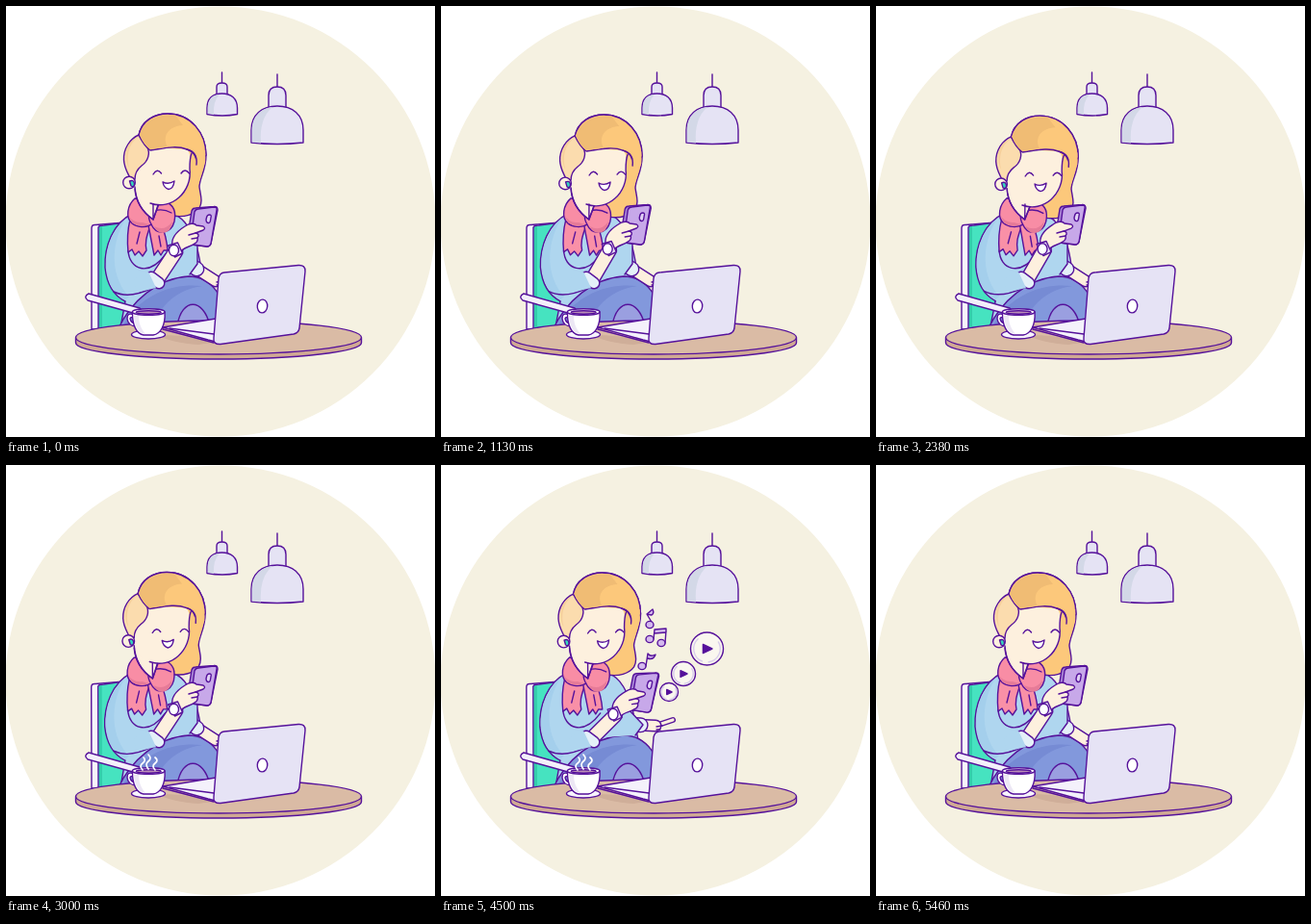
Recreate the animation shown at these times as an HTML page. Size 446 by 448 pixels, loop 5500 ms.

```html
<!DOCTYPE html>
<html lang="en">
<head>
<meta charset="utf-8">
<title>Music break</title>
<style>
html, body { margin: 0; width: 100%; height: 100%; overflow: hidden; background: #fff; }
svg { display: block; width: 446px; height: 448px; }
.ink { fill: none; stroke: #56129b; stroke-width: 1.4; stroke-linecap: round; stroke-linejoin: round; }
.flat { stroke: none; }
</style>
</head>
<body>
<svg viewBox="0 0 446 448">
  <circle cx="223" cy="224" r="223.5" fill="#f5f1e1"/>
  <g class="ink">
    <!-- lamps -->
    <path d="M224.5 69V80M282 71V85"/>
    <path fill="#e5e3f4" d="M219 93V84Q219 80 224.500 80T230 84V93ZM273 106V93Q273 84 282 84T291 93V106Z"/>
    <path fill="#e5e3f4" d="M209 112.500V106C209 96 215 91 224.500 91S240.500 96 240.500 106V112.500Q225 115.500 209 112.500Z"/>
    <path class="flat" fill="#d3d8e7" d="M209.700 112V106C210 97 215 92 222 92Q215 99 216 113Z"/>
    <path fill="#e5e3f4" d="M255 142V129C255 113 266 104 282 104S309 113 309 129V142Q282 145 255 142Z"/>
    <path class="flat" fill="#d3d8e7" d="M255.700 141.500V129C256 115 265 106 277 105Q263 117 265 142.500Z"/>

    <g id="chair">
      <path fill="#f7f5fb" d="M89 336V231Q89 227 93 227.500L124 225L128 336Z"/>
      <path fill="#46e3c0" d="M96 336V230Q97 228 102 228L124 225V336Z"/>
      <path class="flat" fill="#33cdab" d="M97 335V230L100 229V335Z"/>
    </g>

    <g id="torso">
      <path fill="#afd6ef" d="M131 216C111 226 102 250 103 272C105 292 114 302 124 307L118 340H215L204 280C201 260 198 240 186 225C178 215 163 211 150 212Z"/>
      <path class="flat" fill="#a4cfec" d="M124 222C110 232 104 252 104 270C106 291 114 300 124 306L128 302C110 284 107 250 124 222Z"/>
      <path d="M127 254C128 274 148 282 166 258M112 297Q128 305 152 293"/>
    </g>

    <path fill="#8298dc" d="M116 337C130 306 158 283 190 281C213 281 229 302 232 337Z"/>
    <path class="flat" fill="#768bd4" d="M127 322C148 298 174 288 204 291C184 294 164 304 153 332H122Z"/>
    <path fill="#9a9fe0" d="M178 332C183 303 205 303 212 332Z"/>

    <g id="farArm"></g>

    <g id="back">
      <g class="head">
        <path fill="#fcc87b" d="M138 135C140 119 154 112 168 112C192 112 208 132 208 155C208 171 201 179 201 188C202 196 205 203 201 210C196 217 185 220 174 218L150 190Z"/>
      </g>
      <path fill="#f990a7" d="M129 222C126 234 126 246 127 256L131 253L134 259L138 255L142 260L146 254C144 244 147 238 150 228Z"/>
      <path fill="#f990a7" d="M148 228L154 259L158 254L161 259L164 254L168 254Q167 240 161 225Z"/>
      <path fill="#f88da5" d="M134 200C126 207 124 220 131 226C136 230 145 231 151 227C157 240 172 236 175 224C177 214 174 207 167 204Z"/>
      <path class="flat" fill="#e67b98" d="M127 217Q132 226 142 225L149 227Q140 231 132 226ZM154 229Q165 235 173 224Q172 235 163 236Q157 236 154 229Z"/>
      <path d="M151 227Q145 216 154 213T172 215M139 235L136 247M159 239L161 250"/>
      <path fill="#fdf0de" d="M134 190C135 205 143 215 153 222L161 200Z"/>
    </g>

    <g class="head">
      <path class="flat" fill="#fdf0de" d="M138 134C129 138 122 148 122.500 160C123 168 127 174 128 179L134 187C135 199 147 208 162 207C182 204 193 190 191 169C191 160 193 154 188 149L150 147Z"/>
      <path d="M150 205C172 213 194 193 191 169Q191 158 193 153"/>
      <path fill="#fbdcae" d="M138 134C129 138 122 148 122.500 160C123 169 127 174 129 179L134 180C134 174 136 170 141 166C148 161 150 153 147 147Z"/>
      <path class="flat" fill="#f6d09c" d="M137 136C127 144 125 157 128 168C125 164 122 150 130 141Z"/>
      <path fill="#fcc87b" d="M138 134C142 118 156 112 168 112C192 112 208 132 208 155L198 168C199 157 196 151 188 149C176 144 160 149 150 150Q143 145 138 134Z"/>
      <path class="flat" fill="#f0bc74" d="M139 134C144 118 158 112 176 113.500L184 124C168 125 162 136 168 146.500L150 149Q143 144 139 134Z"/>
      <path class="flat" fill="#fcc87b" d="M199 152L207.200 150V162L200 186L193 190Q194 165 199 152Z"/>
      <path d="M198 165C199 157 196 151 188 149"/>
      <circle cx="128" cy="183.500" r="6.300" fill="#fdf0de"/>
      <path fill="#35d8bb" d="M128.500 182Q133 180 133.500 185Q133 189 130 187Z"/>
      <path d="M153 175Q157 168 161.500 174M182 174Q186 168 190.500 174"/>
      <path fill="#fff" d="M163 183Q169 186 175 182Q174 190 169 190.500Q164 189 163 183Z"/>
    </g>
    <path id="cord"/>

    <g id="nearArm"></g>
    <g id="phone">
      <path fill="#a884d6" d="M193 213Q194 210 197 210L216 208.500Q220 208 220 212L213 247Q212 250 209 250L192 248Q187 248 188 244Z"/>
      <path fill="#c7a8e9" d="M196 214Q197 211 200 211L216 209Q220 209 219 212L213 247Q212 250 209 250L194 248Q191 248 192 244Z"/>
      <path fill="#e2d2f5" d="M208.500 220Q209 217 211.500 217T213 220L212.500 223Q212 226 210 225.500T208 222Z"/>
      <path fill="#fdf0de" d="M173 250C171 241 178 234 186 229C190 226 196 225 198 228L205 229Q208 231 205 233L197 236Q202 237 199 241Q200 245 196 247C191 251 185 250 181 256Z"/>
      <path d="M197 236L190 238M199 241L193 242"/>
    </g>
    <g id="watch">
      <path fill="#e8e1f6" d="M-6 -5L4 -8L9 3L1 7Z"/>
      <ellipse rx="5" ry="5.800" fill="#fff"/>
    </g>

    <path fill="#f3effa" d="M86 299L139 314Q143 318 139 321L85 306Q80 302 86 299Z"/>

    <!-- table -->
    <path fill="#d0a993" d="M72.500 345V350A148.500 17 0 0 0 369.500 350V345Z"/>
    <ellipse cx="221" cy="344.500" rx="148.500" ry="17.500" fill="#dabba5"/>
    <path class="flat" fill="#cfae99" d="M160 343Q180 340 214 350L200 352Q172 350 160 343Z"/>

    <!-- cup -->
    <ellipse cx="148" cy="341.500" rx="17.500" ry="4.500" fill="#f7f3fc"/>
    <path fill="#fff" d="M133 321Q126 318 126 325Q127 333 136 333V330Q130 330 129 325Q129 323 133 324Z"/>
    <path fill="#fff" d="M131.500 318C131 332 136 341 143 342H153C161 341 166 331 165 318Z"/>
    <path class="flat" fill="#ece7f4" d="M133 322C134 333 138 340 145 341C140 335 138 329 138 322Z"/>
    <ellipse cx="148.200" cy="318" rx="16.800" ry="3.300" fill="#fff"/>
    <ellipse cx="148.200" cy="318.500" rx="13" ry="1.700" fill="#b98fb5"/>
    <path id="steam" style="stroke:#fff;stroke-width:1.700" d="M142 317Q138 313 142 310T143 304M148 316Q144 311 148 308T148 301M155 317Q151 313 155 310T155 304"/>

    <!-- laptop -->
    <path fill="#f4f1fb" d="M163 334L218 325V349L210 347Z"/>
    <path d="M163 334V336L216 350M170 335L216 341"/>
    <path fill="#e6e3f5" d="M221 283Q222 277.500 227 277L304 269.500Q311.500 269 311 276L305 335Q304 340 299 341L223 351.500Q215 352 216 345Z"/>
    <ellipse cx="266.500" cy="312" rx="5.200" ry="6.900" fill="#fff" transform="rotate(5 266.500 312)"/>

    <g id="icons"></g>
  </g>
</svg>
<script>
const LOOP = 5500;
const $ = id => document.getElementById(id);
const SKIN = '#fdf0de', BLUE = '#afd6ef', PALE = '#e4f0f8';

// Each row: time, lean, head lift, phone x, phone y, phone turn
const POSE = [
  [0, 0, 0, 0, 0, 0],
  [580, 1, 2, -2, -2, 0],
  [1670, 0, 0, -1.5, -2, 0],
  [2330, 1, 2, -2, -2, 0],
  [3000, -.35, -.5, 0, 0, 0],
  [3260, 0, 0, 0, 0, 0],
  [3700, -5.2, -3, 11, 16, 19],
  [3880, -5.2, -3, 11, 16, 19],
  [4260, .2, .5, 6, 6, 1],
  [4500, -.2, 0, 6, 7, 2],
  [4980, .4, 1, 6, 7, 2],
  [5380, 0, 0, 0, 0, 0],
  [5500, 0, 0, 0, 0, 0]
];
// Each row: time, shoulder, elbow, wrist, fingertip
const REST = [190, 240, 190, 268, 218, 286, 225, 291];
const TAP = [186, 250, 196, 273, 210, 245, 223, 222];
const POINT = [184, 252, 201, 270, 223, 271, 241, 265];
const REACH = [
  [0, ...REST], [3220, ...REST], [3650, ...TAP], [3900, ...TAP],
  [4220, ...POINT], [4980, ...POINT], [5360, ...REST], [5500, ...REST]
];

const clamp = x => Math.max(0, Math.min(1, x));
const smooth = x => x * x * (3 - 2 * x);
const fade = (t, a, b, c, d) => smooth(clamp((t - a) / (b - a))) * (1 - smooth(clamp((t - c) / (d - c))));

function sample(rows, t) {
  const i = Math.max(1, rows.findIndex(r => r[0] >= t));
  const a = rows[i - 1], b = rows[i];
  const k = smooth(clamp((t - a[0]) / (b[0] - a[0])));
  return a.slice(1).map((v, n) => v + (b[n + 1] - v) * k);
}

// A rounded limb: wide ink line with a slightly thinner colour line on top
function limb(d, width, color) {
  const line = (stroke, w) => `<path d="${d}" style="stroke:${stroke};stroke-width:${w}"/>`;
  return line('#56129b', width) + line(color, width - 2.8);
}

const play = (x, y, r) => [x, y, `<circle r="${r}" fill="#faf7ef"/>
  <path d="M${-r * .55} ${-r * .6}A${r * .82} ${r * .82} 0 0 0 ${-r * .3} ${r * .76}" style="stroke:#d8cceb"/>
  <path d="M${r * .7} ${-r * .42}A${r * .82} ${r * .82} 0 0 1 ${r * .1} ${r * .81}" style="stroke:#d8cceb"/>
  <path fill="#56129b" d="M${-r * .24} ${-r * .27}L${r * .32} 0L${-r * .24} ${r * .27}Z"/>`];
const noteHead = (x, y) => `<ellipse cx="${x}" cy="${y}" rx="4" ry="3.600" fill="#d4b9ed"/>`;
const icons = [
  [214, 204, `<path fill="#d4b9ed" d="M-1 5L1 -8Q4 -4 9 -7Q7 -1 1 -3"/>` + noteHead(-5, 5)],
  play(237, 236, 9.5),
  [224, 179, `<path fill="#d4b9ed" d="M-3 2L-2 -8L10 -9V-5L-2 -4M10 -7L9 6"/>` + noteHead(-7, 2) + noteHead(5, 6)],
  play(252, 217, 12.5),
  [217, 160, `<path fill="#d4b9ed" d="M3 5L-3 -5L3 -10Q5 -6 2 -4L-3 -5"/>` + noteHead(0, 6)],
  play(276.5, 191, 17)
];
$('icons').innerHTML = icons.map(i => `<g>${i[2]}</g>`).join('');
const iconNodes = [...$('icons').children];
const heads = document.querySelectorAll('.head');

function draw(t) {
  const [lean, lift, px, py, turn] = sample(POSE, t);
  const tilt = `rotate(${lean} 150 320)`;
  const nod = `translate(0 ${lift}) rotate(${-lean * .6} 150 205)`;
  $('chair').setAttribute('transform', `rotate(${Math.min(0, lean) * .5} 92 335)`);
  $('torso').setAttribute('transform', tilt);
  $('back').setAttribute('transform', tilt);
  heads[0].setAttribute('transform', nod);
  heads[1].setAttribute('transform', `${tilt} ${nod}`);
  $('cord').setAttribute('transform', tilt);
  $('cord').setAttribute('d', `M134 ${188 + lift}C135 205 143 215 153 222L158 ${207 + lift}M153 206V222`);
  $('phone').setAttribute('transform', `translate(${px} ${py}) rotate(${turn} 205 229)`);

  const wx = 174.5 + px * .75, wy = 254 + py * .74;
  $('watch').setAttribute('transform', `translate(${wx} ${wy}) rotate(${turn * .6})`);
  $('nearArm').innerHTML =
    limb(`M158 283L${wx + 2} ${wy + 1}`, 16, SKIN) +
    limb('M151 282L159 288', 13, PALE) +
    `<path class="flat" fill="${BLUE}" d="M133 284L148 276L156 293L135 298Z"/>`;

  const [sx, sy, ex, ey, hx, hy, fx, fy] = sample(REACH, t);
  const cx = ex + (hx - ex) * .3, cy = ey + (hy - ey) * .3;
  $('farArm').innerHTML =
    limb(`M${hx} ${hy}L${fx} ${fy}`, 6, SKIN) +
    limb(`M${ex} ${ey}L${hx} ${hy}`, 13, SKIN) +
    `<path d="M${hx + 1} ${hy + 1}l6 -1M${hx + 1} ${hy + 4}l4 0"/>` +
    limb(`M${ex} ${ey}L${cx} ${cy}`, 16, PALE) +
    `<path class="flat" fill="${BLUE}" d="M168 235L${sx} ${sy}L${sx + 9} ${sy}L${ex + 9} ${ey}L${ex + 1} ${ey + 11}L168 283Z"/>
     <path d="M${sx + 9} ${sy}L${ex + 9} ${ey}L${ex + 1} ${ey + 11}"/>`;

  const steam = Math.max(fade(t, 2560, 2900, 3200, 3560), fade(t, 4060, 4400, 4700, 5060));
  $('steam').style.opacity = steam;
  $('steam').setAttribute('transform', `translate(0 ${(1 - steam) * 3})`);

  icons.forEach(([x, y], i) => {
    const s = fade(t, 4030 + i * 45, 4220 + i * 45, 4900 + i * 30, 5090 + i * 30);
    const k = .35 * (1 - s);
    iconNodes[i].setAttribute('transform',
      `translate(${x + (212 - x) * k} ${y + (226 - y) * k}) scale(${s})`);
    iconNodes[i].style.display = s > .01 ? '' : 'none';
  });
}

function tick() {
  draw(performance.now() % LOOP);
  requestAnimationFrame(tick);
}
tick();
</script>
</body>
</html>
```
